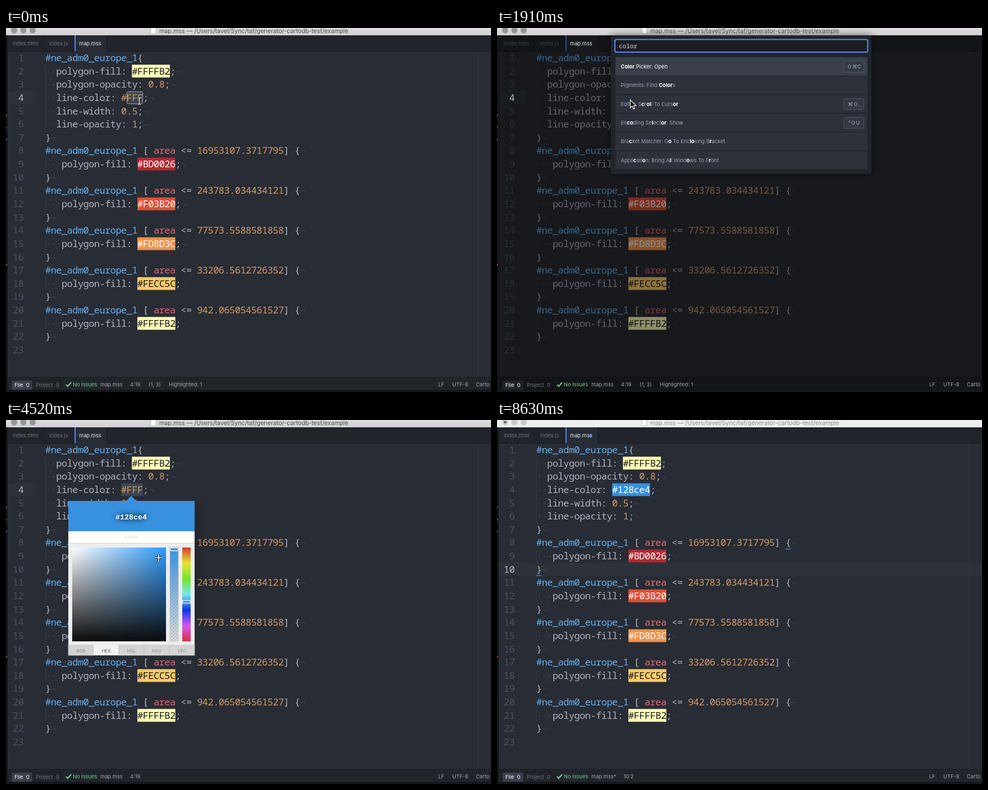
An HTML page for the animation above (8.73 s loop, 864x648 px).

```html
<!DOCTYPE html>
<html lang="en">
<head>
<meta charset="utf-8">
<title>Color picker in a code editor</title>
<style>
  html, body { margin: 0; width: 100%; height: 100%; overflow: hidden; background: #121418; }
  svg { display: block; width: 864px; height: 648px; }
  text { font: 9.3px Inter, "DejaVu Sans", sans-serif; white-space: pre; }
  .code { font: 17px "Noto Sans Mono", "DejaVu Sans Mono", monospace; letter-spacing: -.55px; }
  .query { font: 11.6px "Noto Sans Mono", "DejaVu Sans Mono", monospace; letter-spacing: -.46px; }
  .hex { font: bold 13.4px "Liberation Mono", "Courier New", monospace; }
  .mid { text-anchor: middle; }
  .hit { font-weight: 700; fill: #fff; }
</style>
</head>
<body>
<svg id="stage" viewBox="0 0 864 648">
  <defs>
    <linearGradient id="toHue"><stop stop-color="#fff"/><stop offset="1" stop-color="#fff" stop-opacity="0"/></linearGradient>
    <linearGradient id="toBlack" x2="0" y2="1"><stop stop-color="#0b0a0b" stop-opacity="0"/><stop offset="1" stop-color="#0b0a0b"/></linearGradient>
    <linearGradient id="hues" x2="0" y2="1"></linearGradient>
    <linearGradient id="fade" x2="0" y2="1"><stop class="tint"/><stop class="tint" offset="1" stop-opacity="0"/></linearGradient>
    <linearGradient id="bar" x2="0" y2="1"><stop stop-color="#dedcde"/><stop offset="1" stop-color="#d2d0d2"/></linearGradient>
    <pattern id="checks" width="6" height="6" patternUnits="userSpaceOnUse">
      <path d="M0 0h6v6H0z" fill="#dedede"/><path d="M0 0h3v3H0zM3 3h3v3H3z" fill="#c6c6c6"/>
    </pattern>
    <clipPath id="listClip"><path d="M210 52h451v262H210z"/></clipPath>
    <filter id="soft" x="-30%" y="-30%" width="160%" height="160%"><feGaussianBlur stdDeviation="7"/></filter>
    <filter id="glow" x="-50%" y="-80%" width="200%" height="260%"><feGaussianBlur stdDeviation="4"/></filter>
  </defs>
</svg>
<script>
const LOOP = 8730, CW = 9.65, LH = 23.636, X0 = 70;
const stage = document.getElementById('stage');
const C = { text: '#abb2bf', blue: '#61afef', num: '#d19a66', red: '#e06c75', dim: '#3b4048', accent: '#568af2', ui: '#9da5b4' };

function add(parent, tag, attrs = {}, str) {
  const n = document.createElementNS('http://www.w3.org/2000/svg', tag);
  set(n, attrs);
  if (str !== undefined) n.textContent = str;
  return parent.appendChild(n);
}
function set(n, attrs) { for (const k in attrs) n.setAttribute(k, attrs[k]); }
const group = (p, a) => add(p, 'g', a);
const rect = (p, x, y, width, height, fill, more) => add(p, 'rect', { x, y, width, height, fill, ...more });
const text = (p, x, y, str, fill, more) => add(p, 'text', { x, y, fill, ...more }, str);
const path = (p, d, more) => add(p, 'path', { d, fill: 'none', ...more });
const show = (n, on) => { n.style.display = on ? '' : 'none'; };
const put = (n, str) => { if (n.textContent !== str) n.textContent = str; };
const mid = row => 53 + (row - 1) * LH;
const colX = col => X0 + col * CW;

// Window frame
rect(stage, 3, 13, 861, 631, '#282c34');
rect(stage, 0, 644, 864, 4, '#16181c');
[[154, '#777'], [176, '#8a5d4c'], [197, '#4b78ad'], [420, '#b3673c']].forEach(([y, c]) => rect(stage, 0, y, 1.5, 3, c));
rect(stage, 3, 13, 861, 28, '#21252b');
rect(stage, 3, 41, 861, 1, '#181a1f');
rect(stage, 121, 13, 59, 29, '#282c34');
[66, 121, 179].forEach(x => rect(stage, x, 13, 1, 28, '#181a1f'));
rect(stage, 122, 13, 2, 28, C.accent);
text(stage, 12, 31, 'index.html', '#6b717d');
text(stage, 77, 31, 'index.js', '#6b717d');

// Editor
const gutterMark = rect(stage, 3, 0, 49, LH, '#2c313a');
const lineMark = rect(stage, 3, mid(10) - 11.8, 861, LH, '#2c313a');
rect(stage, 841, 42, 1, 580, '#343941');
const numX = n => 12 + (n < 10 ? CW : 0);
for (let n = 1; n <= 23; n++) text(stage, numX(n), mid(n) + 6, n, '#495162', { class: 'code' });

function code(p, row, col, tokens) {
  const y = mid(row);
  for (const [str, fill, chip] of tokens) {
    if (chip) rect(p, colX(col), y - 11.3, str.length * CW, 22.8, chip);
    text(p, colX(col), y + 6, str, fill, { class: 'code', ...(fill === '#fff' && { 'font-weight': 700 }) });
    col += str.length;
  }
  text(p, colX(col), y + 6, '¬', C.dim, { class: 'code' });
}
function indent(row, n) {
  text(stage, X0, mid(row) + 6, '·'.repeat(n), '#424751', { class: 'code' });
  for (let c = 0; c < n; c += 2) rect(stage, colX(c), mid(row) - 11.8, 1, LH, '#363b44');
}
const NAME = ['#ne_adm0_europe_1', C.blue];
const prop = (name, ...rest) => [[name + ': ', C.text], ...rest, [';', C.text]];
const num = s => [s, C.num];
code(stage, 1, 0, [NAME, ['{', C.text]]);
for (let r = 2; r <= 6; r++) indent(r, 2);
code(stage, 2, 2, prop('polygon-fill', ['#FFFFB2', '#1a1a1a', '#fefdb8']));
code(stage, 3, 2, prop('polygon-opacity', num('0.8')));
code(stage, 5, 2, prop('line-width', num('0.5')));
code(stage, 6, 2, prop('line-opacity', num('1')));
text(stage, X0, mid(7) + 6, '}', C.text, { class: 'code' });
text(stage, colX(1), mid(7) + 6, '¬', C.dim, { class: 'code' });
[['16953107.3717795', '#BD0026', '#fff', '#b02a31'],
 ['243783.034434121', '#F03B20', '#fff', '#de4f35'],
 ['77573.5588581858', '#FD8D3C', '#fff', '#f1924a'],
 ['33206.5612726352', '#FECC5C', '#1a1a1a', '#f8cb66'],
 ['942.065054561527', '#FFFFB2', '#1a1a1a', '#fefdb8']].forEach(([area, hex, ink, chip], i) => {
  const r = 8 + i * 3;
  code(stage, r, 0, [NAME, [' [ ', C.text], ['area', C.red], [' <= ', C.text], num(area), ['] {', C.text]]);
  indent(r + 1, 3);
  code(stage, r + 1, 3, prop('polygon-fill', [hex, ink, chip]));
  code(stage, r + 2, 0, [['}', C.text]]);
});

// Line 4 in its four looks
const line4 = [num('#FFF'), [...num('#FFF'), '#3e4451'], num('#128ce4'), ['#128ce4', '#fff', '#3590e0']].map((value, i) => {
  const g = group(stage);
  if (!i) rect(g, 215.5, mid(4) - 10.5, 28, 21.5, '#3e4451', { rx: 2.5, stroke: '#a3a8b0' });
  code(g, 4, 2, prop('line-color', value));
  return g;
});
const braces = group(stage);
rect(braces, colX(46), 229, CW, 1.2, C.accent);
rect(braces, X0, 276.5, CW, 1.2, C.accent);
const caret = rect(stage, 0, 0, 1.6, LH, C.accent);

// Status bar
rect(stage, 3, 622, 861, 22, '#21252b');
rect(stage, 3, 621.5, 861, 1, '#181a1f');
rect(stage, 10, 627.5, 88, 16.5, '#21252b', { stroke: '#181a1f' });
rect(stage, 10, 627.5, 36.5, 16.5, '#3a3f4b');

const shade = rect(stage, 3, 13, 861, 631, '#000');

// Labels that stay bright
const tabName = text(stage, 130, 31, 'map.mss', '#e4e6ea', { 'font-weight': 500 });
const tabDot = add(stage, 'circle', { cx: 167, cy: 28, r: 2.8, fill: C.accent });
const activeNum = text(stage, 0, 0, '', C.text, { class: 'code' });
text(stage, 15, 639, 'File  0', '#fff', { 'font-weight': 500 });
text(stage, 53, 639, 'Project  0', '#6b717d');
path(stage, 'M107 635l3 3 6-7', { stroke: '#73c990', 'stroke-width': 2.2 });
text(stage, 119, 638, 'No Issues', '#73c990');
const fileName = text(stage, 168, 638, '', C.ui);
const place = text(stage, 221, 638, '', C.ui);
const picked = group(stage);
text(picked, 254, 638, '(1, 3)', C.ui);
text(picked, 290, 638, 'Highlighted: 1', C.ui);
text(stage, 770, 638, 'LF', C.ui);
text(stage, 795, 638, 'UTF-8', C.ui);
text(stage, 837, 638, 'Carto', C.ui);

// Title bar
const bar = rect(stage, 0, 0, 864, 13, 'url(#bar)');
const lights = group(stage);
[14.5, 31, 47.5].forEach(cx => add(lights, 'circle', { cx, cy: 4, r: 5.5 }));
const dirtyLight = add(stage, 'circle', { cx: 14.5, cy: 4, r: 2, fill: '#454545' });
path(stage, 'M258-2h6l3 3v9.500h-9z', { fill: '#fff', stroke: '#aaa', 'stroke-width': .8 });
const title = text(stage, 273, 8.5, 'map.mss — /Users/tavel/Sync/taf/generator-cartodb-test/example', '#444', { style: 'font-size:10.7px' });

// Command palette
const palette = group(stage);
const palShadow = rect(palette, 203, 13, 464, 310, '#000', { filter: 'url(#soft)', opacity: .5 });
const palBox = path(palette, '', { fill: '#21252b' });
rect(palette, 210, 20.5, 450.5, 22.5, '#1b1d23', { rx: 3, stroke: C.accent, 'stroke-width': 2 });
const query = text(palette, 217, 36, '', '#d7dae0', { class: 'query' });
const queryCaret = rect(palette, 0, 22, 1.5, 19, C.accent);

const START = ['About: View Release Notes', 'Application: About', 'Application: Add Project Folder|⇧⌘O',
  'Application: Bring All Windows To Front', 'Application: Hide|⌘H', 'Application: Hide Other Applications|⌥⌘H',
  'Application: Install Update', 'Application: Minimize|⌘M'];
// Brackets mark matched letters
const FOUND = ['[Color] Picker: Open|⇧⌘C', 'Pigments: Find [Color]s', 'Editor: S[c]r[ol]l To Curs[or]|⌘⇧,',
  'En[co]ding Se[l]ect[or]: Show|^⇧U', 'Bra[c]ket Matcher: G[o] To Enc[lo]sing B[r]acket',
  'Appli[c]ati[o]n: Bring A[l]l Wind[o]ws To F[r]ont'];
const MORE = ['Appli[c]ati[o]n: Hide Other App[l]icati[o]ns|⌥⌘H', 'Appli[c]ati[o]n: Add Project Fo[l]der|⇧⌘O'];

function list(rows, hits) {
  const g = group(palette, { 'clip-path': 'url(#listClip)' });
  rows.forEach((row, i) => {
    const [label, keys] = row.split('|'), y = 52 + i * 33.35;
    rect(g, 211, y, 449, 33.4, i ? '#2c313a' : '#3a3f4b');
    rect(g, 211, y + 32.7, 449, 1, '#181a1f');
    const t = text(g, 220.5, y + 20, '', i ? C.ui : '#fff', i ? {} : { 'font-weight': 500 });
    let left = hits;
    label.split(/[[\]]/).forEach((part, j) => {
      const n = j % 2 ? Math.min(left, part.length) : 0;
      left -= n;
      if (n) add(t, 'tspan', { class: 'hit' }, part.slice(0, n));
      add(t, 'tspan', {}, part.slice(n));
    });
    if (keys) {
      const w = keys.length * 9.5 + 7;
      rect(g, 653.5 - w, y + 7, w, 19.5, '#333842', { rx: 2.5, stroke: '#4f5663' });
      text(g, 653.5 - w / 2, y + 20, keys, C.ui, { class: 'mid' });
    }
  });
  return g;
}
const lists = [1, 2, 3, 4, 5].map(n => list(n === 1 ? START : n < 5 ? [...FOUND, ...MORE] : FOUND, n > 1 ? n : 0));

// Color picker
const F = { x: 118, y: 227, size: 167 };
const picker = group(stage);
rect(picker, 115, 150, 232, 200, '#000', { filter: 'url(#soft)', opacity: .14 });
const panel = rect(picker, 111, 144, 225, 275, '#f5f5f5');
const arrow = path(picker, 'M213 145l10-10 10 10z');
const head = rect(picker, 111, 144, 225, 75, '#f5f5f5');
const strip = group(picker);
rect(strip, 111, 198, 225, 21, '#fff');
text(strip, 223, 213, '#fff', '#e6e6e6', { class: 'hex mid', style: 'font-size:10px' });
rect(picker, 111, 219, 225, 1, '#cfcfcf');
const glow = add(picker, 'ellipse', { cx: 223, cy: 173, ry: 7, filter: 'url(#glow)' });
const hexLabel = text(picker, 223, 177, '', '#fff', { class: 'hex mid' });
const box = fill => rect(picker, F.x, F.y, F.size, F.size, fill);
const hueBox = box('red');
box('url(#toHue)');
box('url(#toBlack)');
const ring = group(picker);
add(ring, 'circle', { r: 4, fill: 'none', stroke: '#777', 'stroke-width': 2.4 });
add(ring, 'circle', { r: 4, fill: 'none', stroke: '#fff', 'stroke-width': 1.3 });
['url(#checks)', 'url(#fade)'].forEach(f => rect(picker, 292, F.y, 15, F.size, f));
rect(picker, 292, F.y, 15, F.size, 'none', { stroke: '#c4c4c4', 'stroke-width': .8 });
rect(picker, 314, F.y, 15, F.size, 'url(#hues)');
['#d9382e', '#e5e434', '#76e42b', '#73e9ef', '#0a38e8', '#d457f2', '#d93040'].forEach((c, i) =>
  add(document.getElementById('hues'), 'stop', { offset: i / 6, 'stop-color': c }));
const handle = (x, y, fill) => rect(picker, x, y, 14, 5, fill, { stroke: '#fff', 'stroke-width': 1.3, rx: 1 });
rect(picker, 292, 227, 15.500, 6.500, 'none', { stroke: '#999', 'stroke-width': .8 });
const alphaKnob = handle(292.7, 227.7, 'none');
const hueKnob = handle(314.5, 228, 'none');
['RGB', 'HEX', 'HSL', 'HSV', 'VEC'].forEach((name, i) => {
  const on = name === 'HEX';
  rect(picker, 111 + i * 45, 401, 45, 18, on ? '#f2f2f2' : '#d4d4d4', on ? {} : { stroke: '#bdbdbd', 'stroke-width': .8 });
  text(picker, 133.5 + i * 45, 413.500, name, on ? '#555' : '#888', { class: 'mid', style: 'font-size:8px' });
});

// Mouse shapes, origin at the hot spot
const mouse = group(stage);
const arrowCur = path(mouse, 'M0 0v14l3.300-3 2.300 5.200 2.400-1-2.300-5.100h4.500z', { fill: '#111', stroke: '#fff', 'stroke-width': 1.1 });
const beam = group(mouse);
const cross = group(mouse);
[['#222', 2.6], ['#fff', 1.1]].forEach(([stroke, w]) => {
  path(beam, 'M-3-5.500q3 0 3 2v9q0 1.500-3 1.500M3-5.500q-3 0-3 2v9q0 1.500 3 1.500', { stroke, 'stroke-width': w });
  path(cross, 'M-6 0H6M0-6V6', { stroke, 'stroke-width': w * 1.5 });
});

const TICK = 87.4, GRAB = 2860, PRESS = 4080;
const TRAIL = [[0, 237.5, 129], [2423, 237.5, 128], [GRAB, 321, 229.5], [3120, 324, 331], [3300, 324, 320], [3560, 324, 320],
  [3730, 325, 323], [3820, 325, 323], [PRESS, 280, 300], [4340, 264, 237], [4515, 272, 245], [5590, 272, 245],
  [5591, 270.5, 245], [6400, 270.5, 245], [6580, 376, 244], [6760, 376, 244], [7200, 380, 267], [7560, 380, 267], [7820, 449, 325]];
const ease = k => k * k * (3 - 2 * k);
function trail(t) {
  const i = TRAIL.findIndex(s => s[0] > t);
  if (i < 0) return TRAIL[TRAIL.length - 1].slice(1);
  const [a, ax, ay] = TRAIL[i - 1], [b, bx, by] = TRAIL[i], k = ease((t - a) / (b - a));
  return [ax + (bx - ax) * k, ay + (by - ay) * k];
}
const snap = t => t < 2510 ? t : 2510 + Math.floor((t - 2510) / TICK + .15) * TICK;
const clamp = (v, a, b) => Math.max(a, Math.min(b, v));
const pick = (t, steps) => steps.filter(s => t >= s[0]).pop()[1];

function hsv(h, s, v) {
  return [5, 3, 1].map(n => {
    const k = (n + h / 60) % 6;
    return Math.round(255 * v * (1 - s * clamp(Math.min(k, 4 - k), 0, 1)));
  });
}
const hexOf = rgb => '#' + rgb.map(c => c.toString(16).padStart(2, '0')).join('');
function hsl(h, s, l) {
  return [0, 8, 4].map(n => {
    const k = (n + h / 30) % 12;
    return 255 * (l - s * Math.min(l, 1 - l) * clamp(Math.min(k - 3, 9 - k), -1, 1));
  });
}

function drawPicker(t, x, y) {
  const q = snap(t), pressed = q >= PRESS;
  const hueY = q < GRAB ? 229.5 : q < 3820 ? clamp(y, 229.5, 391) : 323.2;
  const hue = (hueY - 229.5) / 93.7 * 205.1, near = Math.min(hue / 205, 1);
  const corner = hsl(hue + 4 - near, .68 + .28 * near, .51 + .07 * near);
  const px = pressed ? clamp(x, 118, 285) : 123, py = pressed ? clamp(y, 227, 394) : 232;
  const s = (px - F.x) / F.size, v = 1 - (py - F.y) / F.size;
  const rgb = corner.map(c => Math.round((255 + (c - 255) * s) * v));
  const tint = pressed ? `rgb(${rgb})` : '#f5f5f5';
  set(hueBox, { fill: `rgb(${corner.map(Math.round)})` });
  set(hueKnob, { y: hueY - 2 });
  set(ring, { transform: `translate(${px} ${py})` });
  set(arrow, { fill: tint });
  set(head, { fill: tint });
  set(panel, { fill: pressed ? '#ededed' : '#f5f5f5' });
  set(glow, { rx: pressed ? 30 : 18, fill: pressed ? '#000' : '#888', opacity: pressed ? .4 : .75 });
  document.querySelectorAll('.tint').forEach(n => set(n, { 'stop-color': pressed ? tint : '#fff' }));
  show(strip, pressed);
  show(ring, !pressed);
  put(hexLabel, !pressed ? '#FFF' : q >= 4500 ? '#128ce4' : hexOf(hsv(205.1, s, v)));
}

function render(t) {
  const on = (a, b) => t >= a && t < b;
  const [x, y] = trail(snap(t));
  const last = t >= 8630, dirty = t >= 5320;

  const look = pick(t, [[0, 0], [720, 1], [5060, 2], [6220, 3]]);
  line4.forEach((g, i) => show(g, i === look));
  const row = pick(t, [[0, 4], [6580, 9], [7200, 10]]);
  set(gutterMark, { y: mid(row) - 11.8 });
  set(activeNum, { x: numX(row), y: mid(row) + 6 });
  put(activeNum, String(row));
  show(lineMark, last);
  show(braces, t >= 7200);
  show(caret, on(6580, 7650) || on(8000, 8450));
  set(caret, { x: row === 9 ? colX(25) : colX(1), y: mid(row) - 11.8 });

  show(tabDot, dirty);
  show(dirtyLight, dirty);
  put(fileName, dirty ? 'map.mss*' : 'map.mss');
  put(place, pick(t, [[0, '4:19'], [5060, '4:22'], [6580, '9:26'], [7200, '10:2']]));
  set(place, { x: dirty ? 225.5 : 221 });
  show(picked, t < 2090);
  set(bar, { fill: last ? '#efeeef' : 'url(#bar)' });
  set(lights, { fill: last ? '#cbcacb' : dirty ? '#a3a2a3' : '#969596' });
  set(title, { fill: last ? '#8c8c8c' : '#484848' });

  const open = on(720, 2090);
  show(palette, open);
  set(shade, { opacity: open ? (t < 900 ? .2 : .44) : 0 });
  if (open) {
    const n = pick(t, [[720, 1], [1040, 2], [1190, 3], [1280, 4], [1460, 5]]);
    const h = n === 5 ? 247 : 310;
    put(query, 'color'.slice(0, n));
    set(queryCaret, { x: 217 + n * 6.6 });
    show(queryCaret, t < 1910);
    lists.forEach((g, i) => show(g, i === n - 1));
    set(palBox, { d: `M203 13h464v${h - 5}q0 5-5 5h-454q-5 0-5-5z` });
    set(palShadow, { height: h });
  }

  const picking = on(2090, 5060);
  show(picker, picking);
  if (picking) drawPicker(t, x, y);

  const inField = x > 118 && x < 285 && y > 227 && y < 394;
  const kind = t < 720 || t >= 5590 ? beam : t >= 3820 && inField ? cross : arrowCur;
  [beam, cross, arrowCur].forEach(n => show(n, n === kind));
  show(mouse, t < 7820);
  set(mouse, { transform: `translate(${x} ${y})` });
}

const born = performance.now();
function loop() {
  render((performance.now() - born) % LOOP);
  requestAnimationFrame(loop);
}
loop();
</script>
</body>
</html>
```
